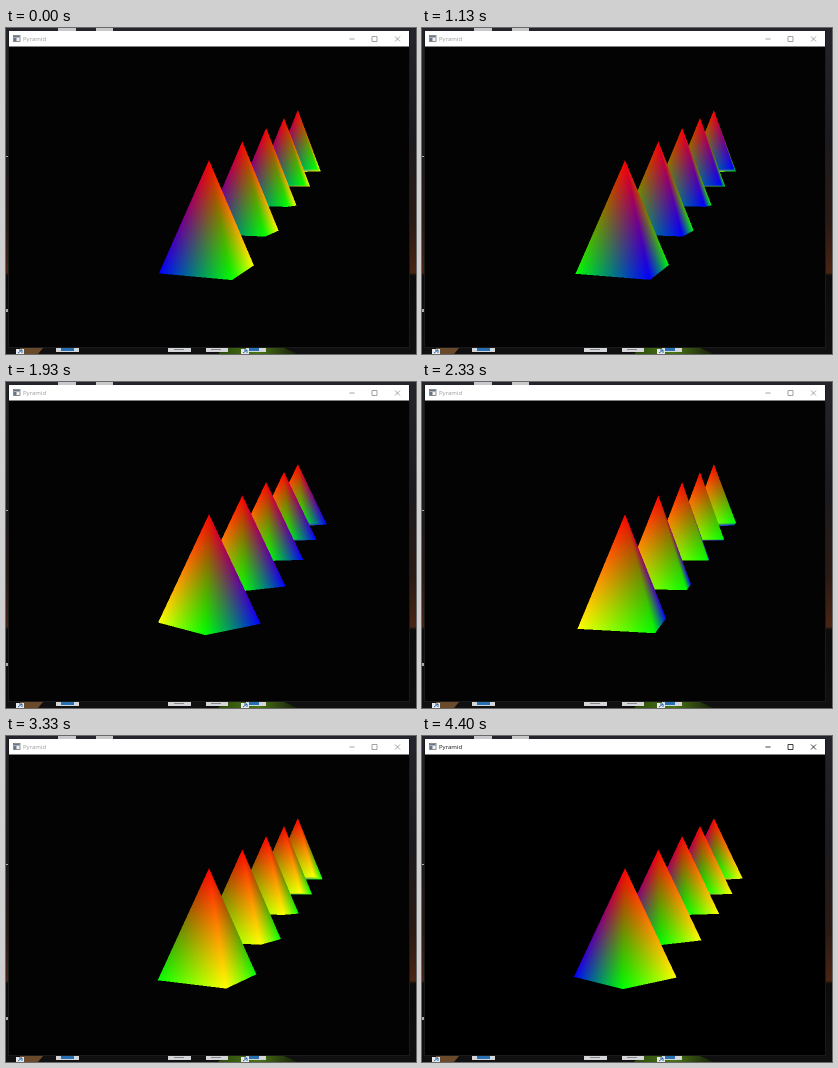
An HTML page with a canvas for the animation above (4590 ms loop, 410 px wide and 326 px high).

```html
<!DOCTYPE html>
<html lang="en">
<head>
<meta charset="utf-8">
<title>Pyramid</title>
<style>
  html, body { margin: 0; width: 100%; height: 100%; overflow: hidden; background: #111; }
  svg, canvas { position: absolute; display: block; }
  svg { left: 0; top: 0; }
  canvas { left: 140px; top: 70px; width: 200px; height: 190px; }
  #client { fill: #030303; }
  #title { font: 6px "Open Sans", sans-serif; fill: #999; }
  #buttons { stroke: #8c8c8c; stroke-width: .8; fill: none; }
  .active #client { fill: #000; }
  .active #title { fill: #111; }
  .active #buttons { stroke: #111; }
</style>
</head>
<body>
<svg width="410" height="326" viewBox="0 0 410 326">
  <defs>
    <linearGradient id="sky" x1="0" y1="0" x2="0" y2="1">
      <stop offset="0" stop-color="#24242c"/>
      <stop offset=".35" stop-color="#1c1a1e"/>
      <stop offset=".6" stop-color="#2a1a14"/>
      <stop offset=".75" stop-color="#4a2413"/>
      <stop offset=".76" stop-color="#0b0b0c"/>
      <stop offset="1" stop-color="#101011"/>
    </linearGradient>
    <linearGradient id="grass">
      <stop offset="0" stop-color="#2c4a0c"/>
      <stop offset=".5" stop-color="#4a7414"/>
      <stop offset="1" stop-color="#141c0a"/>
    </linearGradient>
  </defs>
  <rect width="410" height="326" fill="url(#sky)"/>
  <path d="M52 0h18v3h-18zM90 0h17v3h-17z" fill="#c9c9cb"/>
  <path d="M0 128h3v1h-3zM0 281h2v3h-2z" fill="#aaa"/>
  <path d="M212 326l6-6h60l14 6z" fill="url(#grass)"/>
  <path d="M14 320h23l-5 6h-18z" fill="#6b4a2c"/>
  <path d="M50 320h23v4h-23zM162 320h23v4h-23zM200 320h22v4h-22zM240 320h20v4h-20z" fill="#d4d6da"/>
  <path d="M55 320h13v3h-13zM243 320h10v3h-10z" fill="#2870b4"/>
  <path d="M168 321h10v1h-10zM205 321h10v1h-10z" fill="#888"/>
  <path d="M10 321h8v5h-8zM235 321h8v5h-8z" fill="#e8e8e8"/>
  <path d="M12 325l4-3m-3 0h3v3M237 325l4-3m-3 0h3v3" stroke="#2868b0" fill="none"/>
  <rect x="2" y="3" width="402" height="317" fill="#1a1a1a"/>
  <rect id="client" x="3" y="18" width="400" height="301"/>
  <rect x="3" y="3" width="400" height="15.5" fill="#fff"/>
  <rect x="7.5" y="7.5" width="6.5" height="6" fill="#f4f4f4" stroke="#777" stroke-width=".8"/>
  <path d="M8 8h5.5v1.5h-5.5zM8 10h2.5v3.2h-2.5z" fill="#667487"/>
  <text id="title" x="17" y="13">Pyramid</text>
  <path id="buttons" d="M343.5 11h5M366 8.5h5v5h-5zM389 8.500l5 5m0-5l-5 5"/>
</svg>
<canvas width="400" height="380"></canvas>
<script>
const LOOP = 4590, STEP = 200 / 3, LAST = 66;
const FOCAL = 363.4, CX = 203, CY = 168.5, SCALE = 2, LEFT = 140, TOP = 70;
const RED = [255, 0, 0], GREEN = [0, 255, 0], BLUE = [0, 0, 255], YELLOW = [255, 255, 0];
const CORNERS = [BLUE, GREEN, YELLOW, GREEN];

// time in ms, heading in degrees
const SPIN = [[0, 22.9], [600, 68.2], [1133, 115.1], [1600, 148],
              [2333, 210.9], [3333, 286.7], [4400, 358]];

const canvas = document.querySelector('canvas');
const ctx = canvas.getContext('2d');
const image = ctx.createImageData(canvas.width, canvas.height);

function heading(t) {
  let i = 1;
  while (i < SPIN.length - 1 && t > SPIN[i][0]) i++;
  const [t0, a0] = SPIN[i - 1], [t1, a1] = SPIN[i];
  return a0 + (a1 - a0) * (t - t0) / (t1 - t0);
}

function project(x, y, depth, color) {
  return {
    x: (CX + FOCAL * x / depth - LEFT) * SCALE,
    y: (CY - FOCAL * y / depth - TOP) * SCALE,
    w: 1 / depth,
    color
  };
}

const cross = (a, b, x, y) => (b.x - a.x) * (y - a.y) - (b.y - a.y) * (x - a.x);

// Fills a front-facing triangle with perspective-correct blended colours.
function triangle(a, b, c) {
  const area = cross(a, b, c.x, c.y);
  if (area >= 0) return;
  const { width, height, data } = image;
  const x0 = Math.max(0, Math.floor(Math.min(a.x, b.x, c.x)));
  const x1 = Math.min(width - 1, Math.ceil(Math.max(a.x, b.x, c.x)));
  const y0 = Math.max(0, Math.floor(Math.min(a.y, b.y, c.y)));
  const y1 = Math.min(height - 1, Math.ceil(Math.max(a.y, b.y, c.y)));
  for (let y = y0; y <= y1; y++) {
    for (let x = x0; x <= x1; x++) {
      const px = x + .5, py = y + .5;
      let u = cross(b, c, px, py) / area;
      let v = cross(c, a, px, py) / area;
      let s = 1 - u - v;
      if (u < 0 || v < 0 || s < 0) continue;
      u *= a.w; v *= b.w; s *= c.w;
      const sum = u + v + s, p = (y * width + x) * 4;
      for (let k = 0; k < 3; k++) {
        data[p + k] = (u * a.color[k] + v * b.color[k] + s * c.color[k]) / sum;
      }
      data[p + 3] = 255;
    }
  }
}

function pyramid(i, angle) {
  const x = 1.1 * i, y = .82 * i, depth = 10 + 2 * i;
  const apex = project(x, y + 1, depth, RED);
  const base = CORNERS.map((color, k) => {
    const a = (angle + 90 * (k - 1)) * Math.PI / 180;
    return project(x + Math.SQRT2 * Math.sin(a), y - 2, depth - Math.SQRT2 * Math.cos(a), color);
  });
  triangle(base[2], base[1], base[0]);
  triangle(base[3], base[2], base[0]);
  base.forEach((corner, k) => triangle(apex, corner, base[(k + 1) % 4]));
}

let shown = -1;
function draw() {
  const t = performance.now() % LOOP;
  const step = Math.min(LAST, Math.floor((t + 3.4) / STEP));
  if (step !== shown) {
    shown = step;
    image.data.fill(0);
    const angle = heading(step * STEP);
    for (let i = 4; i >= 0; i--) pyramid(i, angle);
    ctx.putImageData(image, 0, 0);
    document.body.classList.toggle('active', step === LAST);
  }
  requestAnimationFrame(draw);
}
draw();
</script>
</body>
</html>
```
